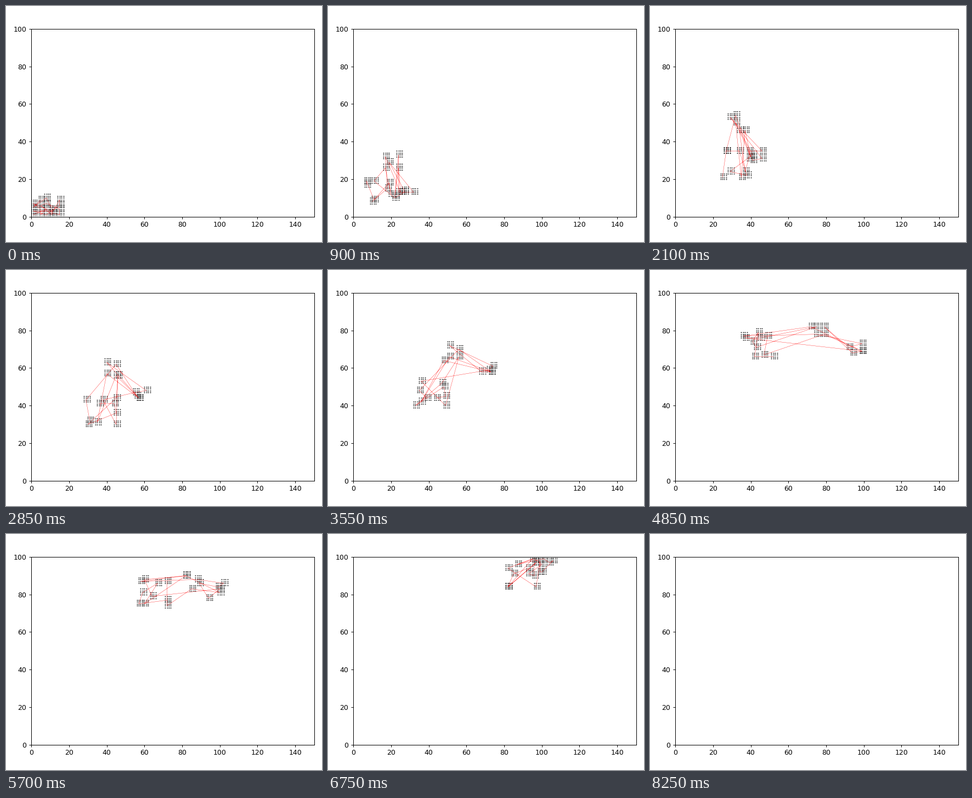
Animation of 576 by 432 pixels, one loop 8.3 s. Source, as a matplotlib script:

```python
import numpy as np
import matplotlib.pyplot as plt
from matplotlib.animation import FuncAnimation

W, H, DPI = 576, 432, 90
FRAMES, INTERVAL = 166, 50

# Each flock: size, spread in x and y, and the centres it flies through.
TIMES = [18, 42, 71, 97, 135, 165]
EXIT_SHIFT = (16, 22)
FLOCKS = [
    (10, (8, 7), [(14, 13), (32, 27), (40, 45), (43, 72), (89, 89)]),
    (5, (4, 4), [(20, 28), (32, 49), (51, 67), (75, 79), (96, 94)]),
    (5, (4, 4), [(27, 9), (42, 31), (70, 61), (94, 71), (101, 93)]),
]
COLUMN_TOPS = np.array([6, 8, 9, 3, 8])

rng = np.random.default_rng(7)
N = sum(size for size, _, _ in FLOCKS)
phase = rng.uniform(0, 2 * np.pi, (N, 2))
rate = rng.uniform(0.03, 0.06, (N, 2))
chain = rng.permutation(N)

# The blocks start packed in five columns of four.
column, row = np.divmod(np.arange(N), 4)
start = np.column_stack([3.5 * column, COLUMN_TOPS[column] * row / 3])
cell = np.array([(i, j) for i in range(4) for j in range(4)])


def flock_centre(path, frame):
    path = np.vstack([path, np.add(path[-1], EXIT_SHIFT)])
    return [np.interp(frame, TIMES, axis) for axis in path.T]


def blocks_at(frame):
    centre = np.vstack([np.tile(flock_centre(path, frame), (size, 1))
                        for size, _, path in FLOCKS])
    spread = np.vstack([np.tile(s, (size, 1)) for size, s, _ in FLOCKS])
    flying = centre + spread * np.sin(phase + rate * frame)
    u = min(frame / TIMES[0], 1)
    return np.rint(start + (flying - start) * u)


fig = plt.figure(figsize=(W / DPI, H / DPI), dpi=DPI)
ax = fig.add_axes([0.08, 46.32 / H, 0.895, 343.68 / H])
ax.set_xlim(0, 150)
ax.set_ylim(0, 100)
dots, = ax.plot([], [], "k.", markersize=1)
links, = ax.plot([], [], "r-", linewidth=0.3)


def update(frame):
    blocks = blocks_at(frame)
    points = (blocks[:, None] + cell).reshape(-1, 2)
    dots.set_data(points[:, 0], points[:, 1])
    links.set_data(blocks[chain, 0] + 1, blocks[chain, 1] + 1)
    return dots, links


anim = FuncAnimation(fig, update, frames=FRAMES, interval=INTERVAL,
                     repeat=True, repeat_delay=0)
plt.show()
```
